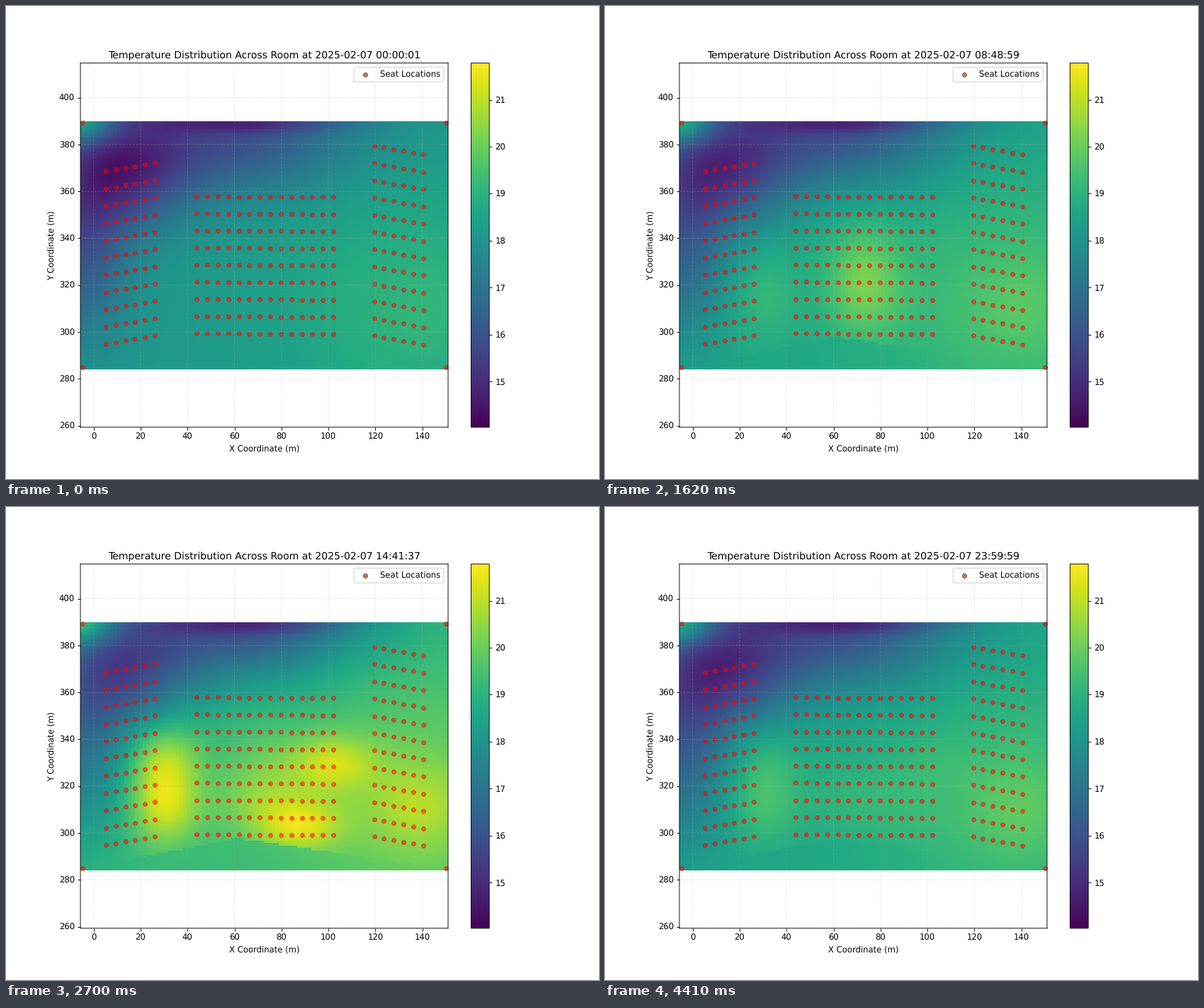
A matplotlib script that plays this animation: 837 px wide and 669 px high, repeating every 4500 ms.

```python
import matplotlib.pyplot as plt
import numpy as np
from matplotlib.animation import FuncAnimation

DPI = 83.7
WIDTH, HEIGHT = 837, 669
FRAMES, INTERVAL = 50, 90
DAY_SPAN = 86398
T_MIN, T_MAX = 14.03, 21.78
ROOM_X, ROOM_Y = (-4.87, 150.2), (284.8, 389.3)

xx, yy = np.meshgrid(np.linspace(*ROOM_X, 100), np.linspace(*ROOM_Y, 100))


def bump(x, y, sx, sy):
    return np.exp(-((xx - x) / sx) ** 2 - ((yy - y) / sy) ** 2)


def pulse(i, peak, width):
    return np.exp(-((i - peak) / width) ** 2)


night = (18.2
         + 0.9 * bump(140, 310, 55, 50)    # warm right side
         + 2.2 * bump(-5, 390, 14, 9)      # mild corner
         - 2.0 * bump(-5, 335, 20, 38)     # cold left wall
         - 2.9 * bump(12, 370, 30, 26)     # cold rear seats
         - 2.2 * bump(62, 384, 48, 24)     # cold rear wall
         - 1.3 * bump(66, 389, 45, 4))
sunlit = 1 - 0.9 * bump(70, 388, 60, 14)

# Seats do not warm the triangle in front of the first row
ridge = np.interp(xx, [ROOM_X[0], 62, ROOM_X[1]], [284.8, 298, 284.8])
seated = np.where(yy < ridge, 0.1, 1)

# Shape of each warm group with its strength, peak frame and duration
GROUPS = [
    (bump(73, 322, 16, 24), 1.9, 22, 7),
    (bump(73, 314, 30, 16), 0.9, 38, 12),
    (bump(30, 314, 14, 18), 2.4, 35, 14),
    (bump(30, 334, 15, 14), 1.6, 36, 12),
    (bump(88, 303, 18, 11), 1.6, 30, 5),
    (bump(102, 330, 18, 12), 1.5, 30, 5),
    (bump(102, 330, 18, 12), 0.7, 44, 4),
    (bump(138, 312, 20, 18), 0.9, 35, 15),
]


def temperature(i):
    lift = np.interp(i, [0, 13, 22, 37, 43, 49], [0, -0.3, 1.0, 1.1, 0.9, 0.4])
    crowd = sum(shape * amp * pulse(i, peak, width)
                for shape, amp, peak, width in GROUPS)
    return np.clip(night + lift * sunlit + crowd * seated, T_MIN, T_MAX)


def seat_block(x0, x1, cols, y0, y1, rows, tilt):
    u, v = np.meshgrid(np.linspace(0, 1, cols), np.linspace(0, 1, rows))
    return np.column_stack([(x0 + (x1 - x0) * u).ravel(),
                            (y0 + (y1 - y0) * v + tilt * u).ravel()])


def clock(i):
    seconds = 1 + i * DAY_SPAN // (FRAMES - 1)
    return f"{seconds // 3600:02d}:{seconds // 60 % 60:02d}:{seconds % 60:02d}"


seats = np.vstack([
    seat_block(5.3, 26.0, 6, 368.6, 294.9, 11, 3.5),
    seat_block(43.9, 102.1, 14, 357.9, 299.4, 9, -0.4),
    seat_block(119.5, 140.3, 6, 379.4, 298.4, 12, -3.8),
    [(x, y) for x in ROOM_X for y in ROOM_Y],
])

plt.rcParams.update({"font.family": "DejaVu Sans", "path.snap": False,
                     "text.hinting": "none", "text.kerning_factor": 0})
fig, ax = plt.subplots(figsize=((WIDTH + 0.001) / DPI, (HEIGHT + 0.001) / DPI), dpi=DPI)
fig.subplots_adjust(left=0.1255, right=0.9005, bottom=0.1094, top=0.8794)
mesh = ax.pcolormesh(xx, yy, night, cmap="viridis", shading="nearest",
                     vmin=T_MIN, vmax=T_MAX)
fig.colorbar(mesh, ax=ax)
ax.scatter(seats[:, 0], seats[:, 1], s=25, c="red", alpha=0.5,
           label="Seat Locations")
ax.set(xlim=(-5.65, 150.98), ylim=(259.33, 414.77),
       xlabel="X Coordinate (m)", ylabel="Y Coordinate (m)")
ax.grid(True, linestyle="--", alpha=0.3)
legend = ax.legend(loc="upper right")
legend.legend_handles[0].set(alpha=1, facecolor="#b98562", edgecolor="#96523c")
title = ax.set_title("")


def draw(i):
    mesh.set_array(temperature(i))
    title.set_text(f"Temperature Distribution Across Room at 2025-02-07 {clock(i)}")
    return mesh, title


animation = FuncAnimation(fig, draw, frames=FRAMES, interval=INTERVAL,
                          repeat=True, repeat_delay=0)
plt.show()
```
